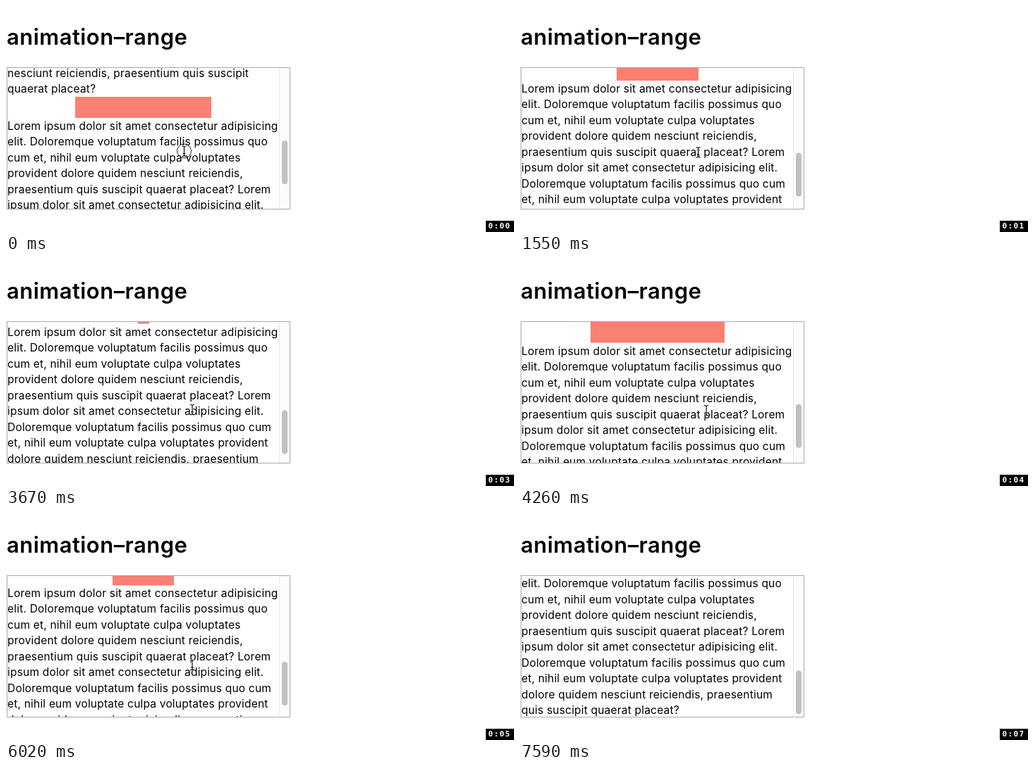
These frames come from a looping animation (720x321 px, 7.92 s). An HTML page:

```html
<!DOCTYPE html>
<html lang="en">
<head>
<meta charset="utf-8">
<title>animation–range</title>
<style>
  html, body { margin: 0; width: 100%; height: 100%; overflow: hidden; background: #fff; }
  body { position: relative; font: 15.5px/22.5px Inter, "Noto Sans", sans-serif; letter-spacing: 0.2px; color: #000; }
  h1, #view, #text, #track, #thumb, #clock, #cursor { position: absolute; }
  h1 { left: 1px; top: 23.5px; margin: 0; font-size: 31px; font-weight: 600; line-height: 40px; letter-spacing: 0.46px; white-space: nowrap; }
  #view { left: 1px; top: 87px; width: 400px; height: 200px; border: 1px solid #a8a8a8; overflow: hidden; }
  #text { left: 0; top: 0; width: 385.5px; white-space: pre; }
  p { position: relative; top: 0.8px; margin: 0; }
  #bar { height: 30px; margin: 0 auto; background: #fa8072; }
  #track { left: 385px; top: 0; width: 14px; height: 200px; background: #fcfcfc; border-left: 1px solid #e8e8e8; }
  #thumb { left: 389px; top: 0; width: 8px; height: 61.5px; border-radius: 4px; background: #c1c1c1; }
  #clock { left: 680px; top: 305px; width: 36.5px; height: 16px; padding-left: 3.5px; background: #000; color: #fff;
    font: bold 11px/16px "DejaVu Sans Mono", monospace; letter-spacing: 1.38px; white-space: nowrap; }
  #cursor { left: 0; top: 0; overflow: visible; fill: none; }
</style>
</head>
<body>
<h1>animation–range</h1>
<div id="view">
  <div id="text"><p>nesciunt reiciendis, praesentium quis suscipit
quaerat placeat?</p><div id="bar"></div><p>Lorem ipsum dolor sit amet consectetur adipisicing
elit. Doloremque voluptatum facilis possimus quo
cum et, nihil eum voluptate culpa voluptates
provident dolore quidem nesciunt reiciendis,
praesentium quis suscipit quaerat placeat? Lorem
ipsum dolor sit amet consectetur adipisicing elit.
Doloremque voluptatum facilis possimus quo cum
et, nihil eum voluptate culpa voluptates provident
dolore quidem nesciunt reiciendis, praesentium
quis suscipit quaerat placeat?</p></div>
  <div id="track"></div>
  <div id="thumb"></div>
</div>
<div id="clock"></div>
<svg id="cursor" width="1" height="1">
  <defs><path id="beam" d="M-3-7Q0-7 0-5Q0-7 3-7M0-5V6M-3 7.5Q0 7.5 0 5.5Q0 7.5 3 7.5M-2 3.5H2"/></defs>
  <circle id="ring" r="10" stroke="#222"/>
  <use href="#beam" stroke="#fff" stroke-width="2.6"/>
  <use href="#beam" stroke="#000" stroke-width="1.1"/>
</svg>
<script>
const LOOP = 7920;
const $ = id => document.getElementById(id);
const ramp = (t, from, to) => Math.min(1, Math.max(0, (t - from) / (to - from)));
const smooth = u => u * u * (3 - 2 * u);

// Turning points of the scroll: [time, top of the bar on the stage]
const turns = [
  [0, 129], [1550, 76], [2750, 58.9], [3400, 54.7],
  [4470, 91.2], [4740, 91.2], [6340, 69.2], [7590, 34.5]
];

function barTop(t) {
  let y = turns[0][1];
  for (let i = 1; i < turns.length; i++) {
    const [t0, y0] = turns[i - 1], [t1, y1] = turns[i];
    y += (y1 - y0) * smooth(ramp(t, t0, t1));
  }
  return y;
}

function draw(t) {
  const y = barTop(t);
  $("text").style.transform = `translateY(${y - 133}px)`;
  // The bar shrinks from half width to nothing while it leaves through the top edge.
  $("bar").style.width = 50 * (1 - ramp(y, 88, 58)) + "%";
  $("thumb").style.transform = `translateY(${103 + (129 - y) * 0.33}px)`;

  const px = 252.5 + 11.5 * ramp(t, 1550, 3650) ** 2;
  const py = 206 + 8 * ramp(t, 800, 4500) + 121 * ramp(t, 7400, 7590);
  $("cursor").style.transform = `translate(${px}px, ${py}px)`;
  $("ring").style.opacity = 1 - ramp(t, 0, 300);
  $("clock").textContent = "0:0" + Math.floor((t + 75) / 1020);
}

const start = performance.now();
function tick(now) {
  draw(Math.max(0, now - start) % LOOP);
  requestAnimationFrame(tick);
}
draw(0);
requestAnimationFrame(tick);
</script>
</body>
</html>
```
